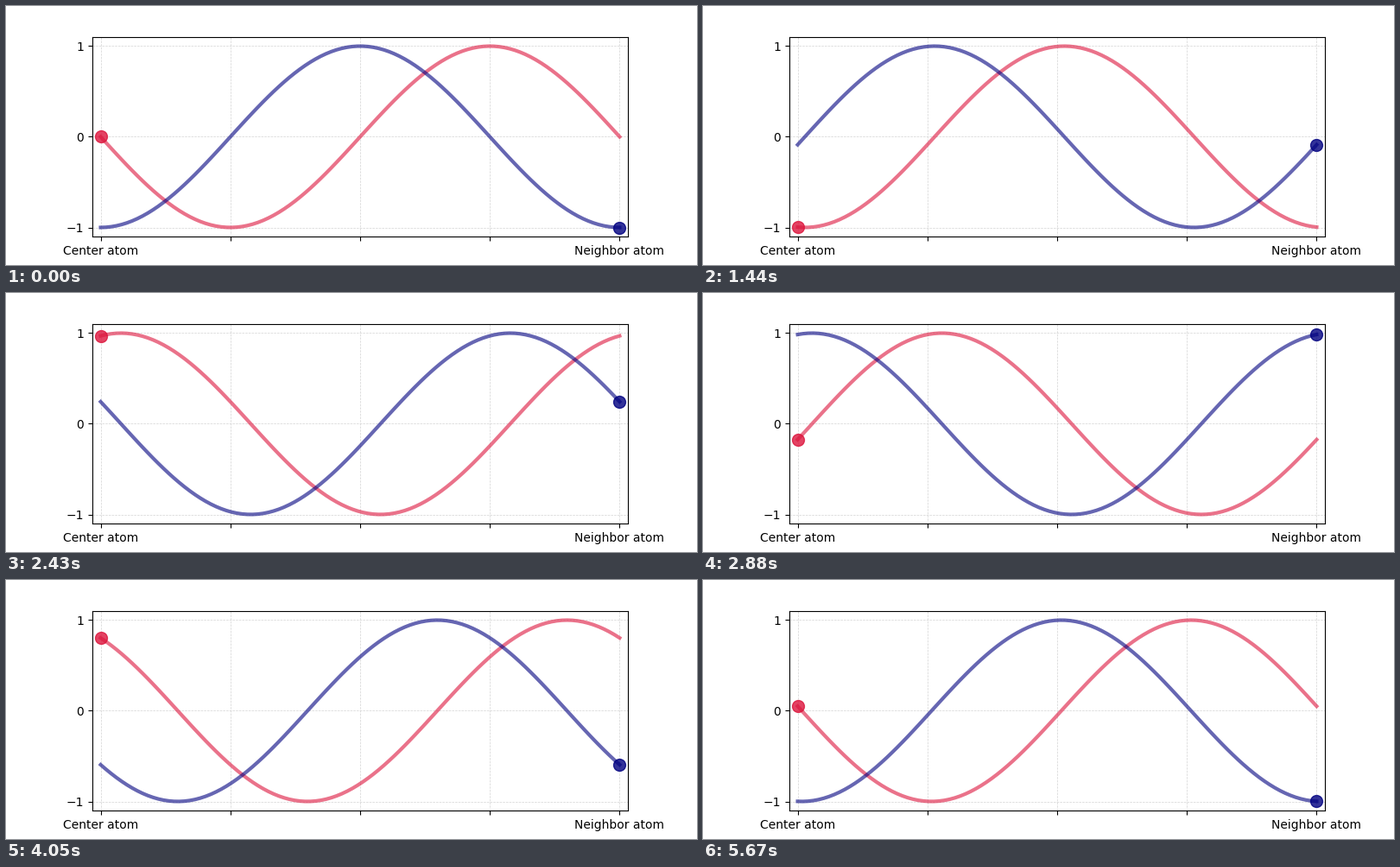
Recreate the animation shown at these times as a matplotlib script. Size 800 by 300 pixels, loop 5700 ms.

```python
import numpy as np
import matplotlib.pyplot as plt
from matplotlib.animation import FuncAnimation

FRAMES = 190
STEP = 0.1  # phase advance per frame, radians
END = 2 * np.pi

plt.rcParams["font.family"] = "DejaVu Sans"

x = np.linspace(0, END, 100)


def center_wave(x, phase):
    return -np.sin(x - phase)


def neighbor_wave(x, phase):
    return -np.cos(x - phase)


fig, ax = plt.subplots(figsize=(8, 3), dpi=100)

# (wave, position of its atom, colour)
waves = [(center_wave, 0, "crimson"), (neighbor_wave, END, "navy")]
lines, atoms = [], []
for wave, pos, color in waves:
    lines += ax.plot(x, wave(x, 0), color=color, lw=3, alpha=0.6)
    atoms.append(ax.scatter([pos], [wave(pos, 0)], s=100, color=color,
                            alpha=0.8, zorder=3))

ax.set_xlim(-0.1, END + 0.1)
low, high = -1, center_wave(x, 0).max()
pad = 0.05 * (high - low)
ax.set_ylim(low - pad, high + pad)
ax.set_xticks(np.linspace(0, END, 5),
              ["Center atom", "", "", "", "Neighbor atom"])
ax.set_yticks([-1, 0, 1])
ax.grid(color="lightgray", linestyle="--", linewidth=0.5)


def update(i):
    phase = STEP * i
    for (wave, pos, _), line, atom in zip(waves, lines, atoms):
        line.set_ydata(wave(x, phase))
        atom.set_offsets([[pos, wave(pos, phase)]])
    return lines + atoms


anim = FuncAnimation(fig, update, frames=FRAMES, interval=30,
                     init_func=lambda: update(0), repeat=True, repeat_delay=0)
plt.show()
```
